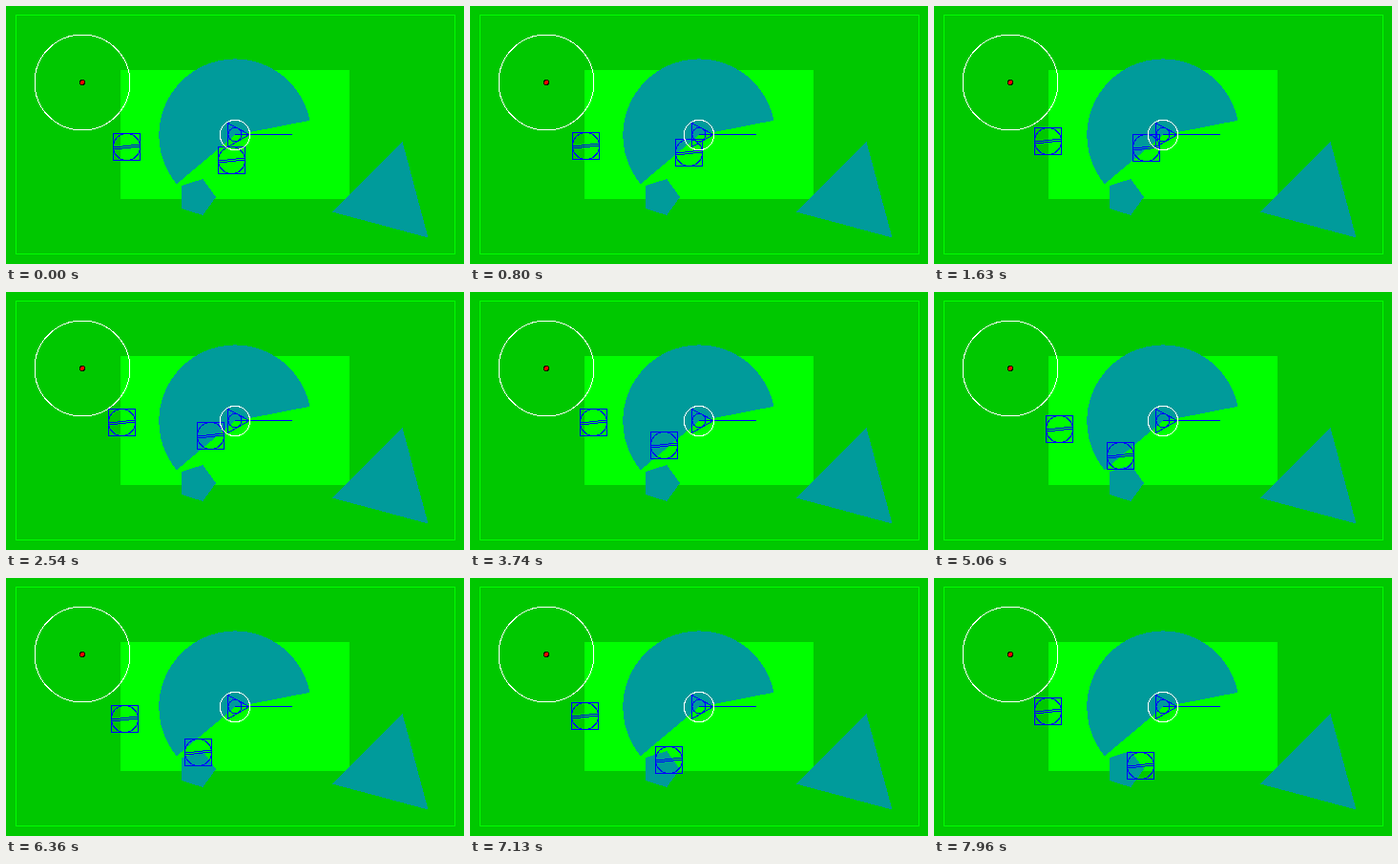
An HTML page that plays this animation: 480 px wide and 270 px high, repeating every 7990 ms.

```html
<!DOCTYPE html>
<html lang="en">
<head>
<meta charset="utf-8">
<title>Shapes</title>
<style>
  html, body { margin: 0; width: 100%; height: 100%; overflow: hidden; background: #00c800; }
  svg { display: block; width: 480px; height: 270px; shape-rendering: crispEdges; }
  .line { fill: none; stroke-width: 1; }
  .white { stroke: #fff; }
  .blue { stroke: #00f; }
  .teal { fill: #009b9b; }
</style>
</head>
<body>
<svg viewBox="0 0 480 270">
  <defs>
    <g id="box" class="line blue">
      <rect x=".5" y=".5" width="28" height="28"/>
      <circle cx="14.5" cy="14.5" r="14"/>
      <path d="M.5 15 28.5 12V14L.5 17Z"/>
    </g>
  </defs>
  <rect width="480" height="270" fill="#00c800"/>
  <rect x="120" y="67" width="240" height="135" fill="#0f0"/>
  <rect class="line" x="10.5" y="9.5" width="460" height="250" stroke="#0f0"/>

  <path class="teal" d="M240 135 178.8 186.3A79.8 79.8 0 1 1 318.4 119.8Z"/>
  <path class="teal" d="M220 200 206.2 219 183.8 211.8V188.2L206.2 181Z"/>
  <path class="teal" d="M415.5 142 442.4 242.4 342 215.5Z"/>

  <circle class="line white" cx="80" cy="80" r="50"/>
  <circle cx="80" cy="80" r="2.5" fill="#f00" stroke="#000"/>

  <use id="left" href="#box"/>
  <use id="right" href="#box"/>

  <g class="line blue">
    <path d="M255 134.5 232.5 147.5V122.5Z"/>
    <circle cx="240" cy="134.5" r="7"/>
    <path d="M240 134.5H300"/>
  </g>
  <circle class="line white" cx="240" cy="135" r="15.7"/>
</svg>
<script>
const LOOP = 7.99;
const { sin, cos, PI } = Math;

// Clockwise circle, one turn in six seconds.
function leftBox(t) {
  const a = (t - 1.66) * PI / 3;
  return [111.1 - 6.2 * cos(a), 127 - 6 * sin(a)];
}

// Counter-clockwise rounded diamond: a circle plus its third harmonic.
function rightBox(t) {
  const a = (t - 1.9) * 0.48;
  return [
    205.6 - 22.4 * sin(a) + 2.1 * sin(3 * a),
    158.3 - 22.4 * cos(a) - 2.1 * cos(3 * a)
  ];
}

function place(id, point) {
  const [x, y] = point.map(Math.round);
  document.getElementById(id).setAttribute("transform", `translate(${x} ${y})`);
}

const start = performance.now();
function draw() {
  const t = (performance.now() - start) / 1000 % LOOP;
  place("left", leftBox(t));
  place("right", rightBox(t));
  requestAnimationFrame(draw);
}
draw();
</script>
</body>
</html>
```
